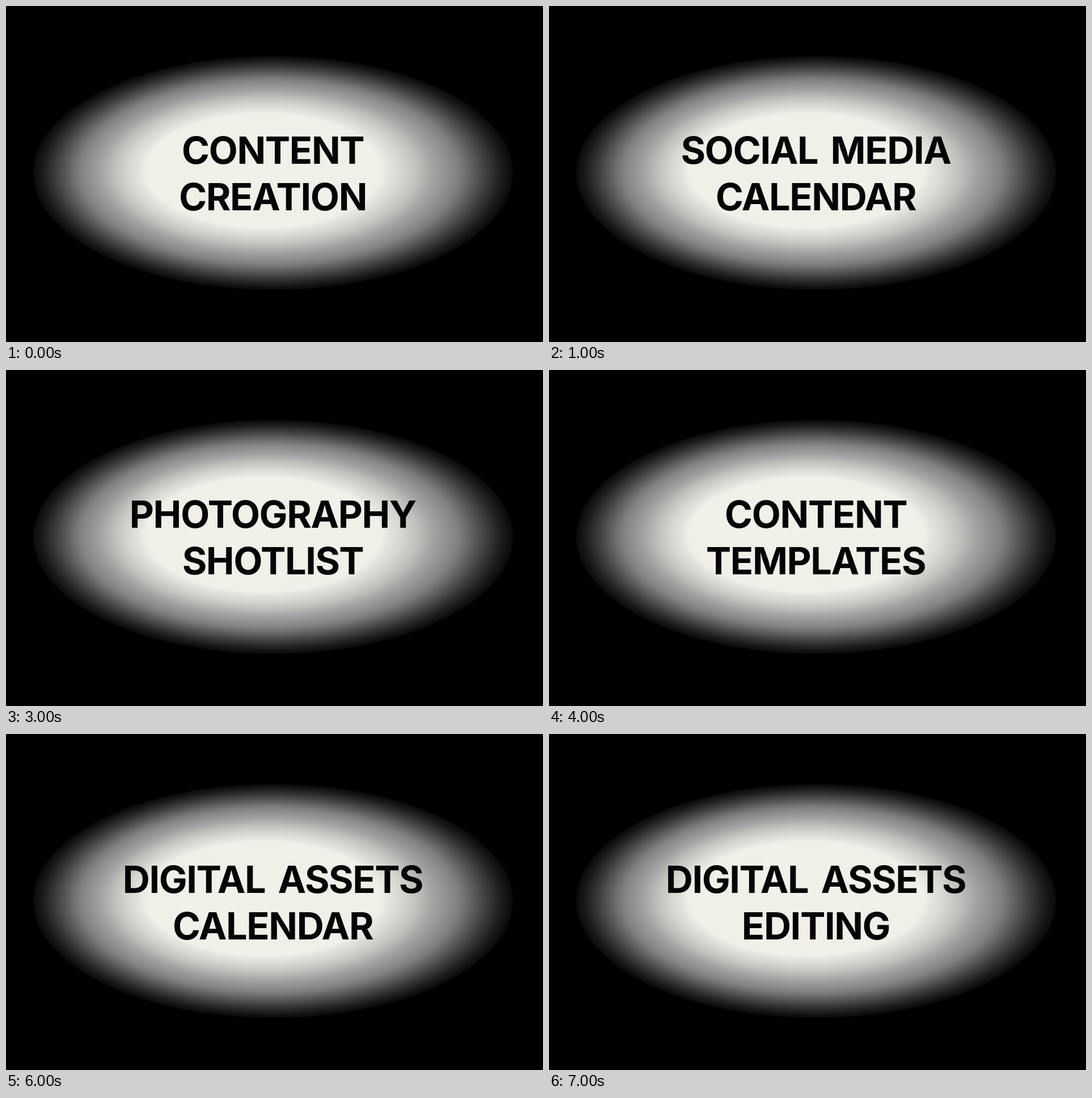
Write an HTML page that moves like this. It is 947x592 px and loops after 8000 ms.

```html
<!DOCTYPE html>
<html lang="en">
<head>
<meta charset="utf-8">
<title>Services</title>
<style>
  html, body { margin: 0; width: 100%; height: 100%; overflow: hidden; background: #000; }
  svg { display: block; width: 100vw; height: 100vh; }
  text {
    font: 700 66.6px Inter, "Liberation Sans", sans-serif;
    fill: #030405;
    text-anchor: middle;
    word-spacing: 8px;
  }
</style>
</head>
<body>
<svg viewBox="0 0 947 592" preserveAspectRatio="none">
  <defs><radialGradient id="glow" fx="0.46" fy="0.48"></radialGradient></defs>
  <rect width="947" height="592" fill="#000"/>
  <ellipse cx="471" cy="294" rx="423" ry="206" fill="url(#glow)"/>
  <text id="top" x="470.5"></text>
  <text id="low" x="470.5"></text>
</svg>
<script>
const SLIDE_MS = 1000;
const LEADING = 82;

// first line, second line, first baseline
const slides = [
  ["CONTENT", "CREATION", 277.7],
  ["SOCIAL MEDIA", "CALENDAR", 277.7],
  ["CUSTOM", "TEMPLATES", 277.7],
  ["PHOTOGRAPHY", "SHOTLIST", 278.3],
  ["CONTENT", "TEMPLATES", 278.3],
  ["CONTENT", "MANGEMENT", 279.6],
  ["DIGITAL ASSETS", "CALENDAR", 279.6],
  ["DIGITAL ASSETS", "EDITING", 279.6]
];

const glowStops = [
  [0, "#f1f0e9"], [0.49, "#f0efe8"], [0.52, "#e4e3dd"], [0.57, "#d6d5cf"],
  [0.63, "#c0c0bc"], [0.69, "#a4a4a4"], [0.79, "#808080"],
  [0.9, "#3c3c3c"], [0.96, "#1a1a1a"], [1, "#0a0a0a"]
];

const byId = id => document.getElementById(id);
const glow = byId("glow"), topLine = byId("top"), lowLine = byId("low");

for (const [offset, color] of glowStops) {
  const stop = document.createElementNS("http://www.w3.org/2000/svg", "stop");
  stop.setAttribute("offset", offset);
  stop.setAttribute("stop-color", color);
  glow.append(stop);
}

// One tracking value for all lines, taken from the longest word.
function findTracking(word, inkWidth) {
  const ctx = document.createElement("canvas").getContext("2d");
  ctx.font = getComputedStyle(topLine).font;
  const m = ctx.measureText(word);
  const ink = m.actualBoundingBoxLeft + m.actualBoundingBoxRight;
  return (inkWidth - ink) / (word.length - 1);
}

const tracking = findTracking("PHOTOGRAPHY", 502);
for (const line of [topLine, lowLine]) line.style.letterSpacing = tracking + "px";

function setLine(node, text, y) {
  node.textContent = text;
  node.setAttribute("y", y);
}

let shown = -1;
function draw(ms) {
  const index = Math.floor(ms / SLIDE_MS) % slides.length;
  if (index === shown) return;
  shown = index;
  const [first, second, y] = slides[index];
  setLine(topLine, first, y);
  setLine(lowLine, second, y + LEADING);
}

const start = performance.now();
function tick() {
  draw(performance.now() - start);
  requestAnimationFrame(tick);
}
draw(0);
requestAnimationFrame(tick);
</script>
</body>
</html>
```
